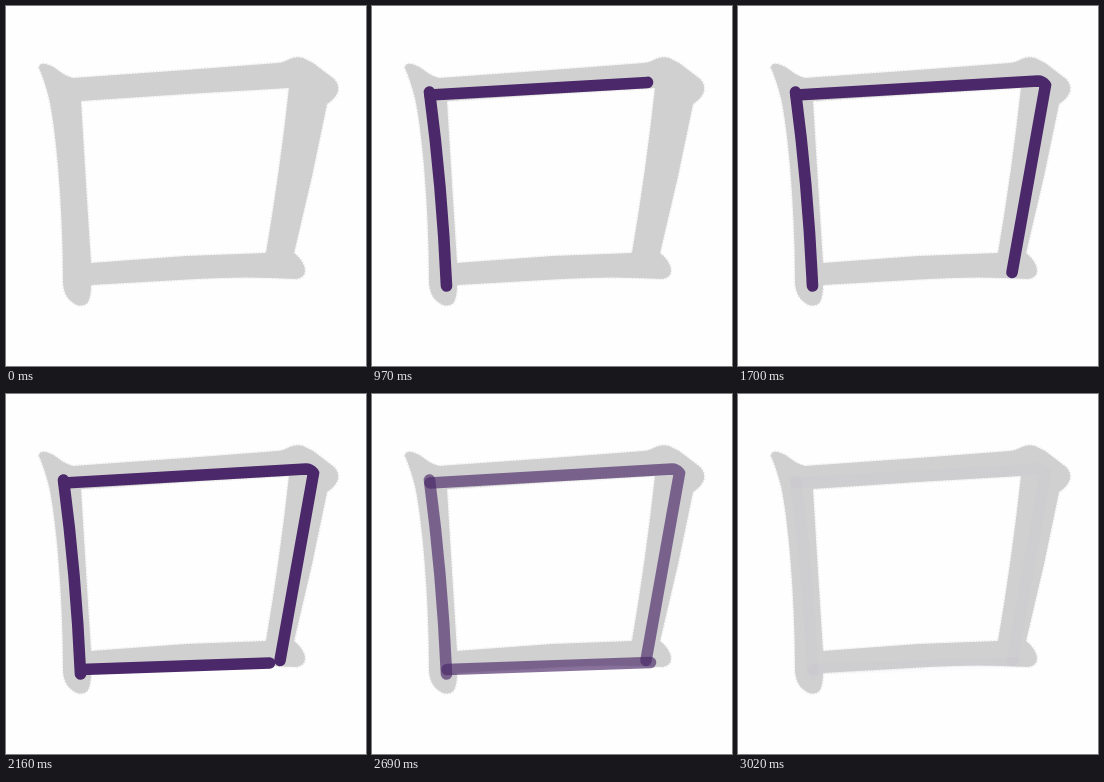
Recreate the animation shown at these times as an HTML page. Size 360 by 360 pixels, loop 3.08 s.

```html
<!DOCTYPE html>
<html lang="en">
<head>
<meta charset="utf-8">
<title>Stroke order</title>
<style>
  html, body { margin: 0; width: 100%; height: 100%; overflow: hidden; background: #fefefe; }
  svg { display: block; width: 100vw; height: 100vh; }
  .shape { fill: #d0d0d0; fill-rule: evenodd; }
  .fringe { fill: none; stroke: #d0d0d0; stroke-width: 2.4; stroke-dasharray: 1.5 1.5; opacity: .45; }
  .pen { fill: none; stroke: #4b2869; stroke-width: 11.6; stroke-linecap: round; stroke-linejoin: round; }
</style>
</head>
<body>
<svg viewBox="0 0 360 360">
  <defs>
    <path id="glyph" d="M33 62 Q33 57 40 58 Q47 60 53 65 Q59 70 67 72 L180 64 L272 57
      Q279 56 284 53 Q290 50 297 52 L307 57 L328 73 Q333 78 332 85 Q330 92 321 98
      L306 170 L288 247 Q298 255 299 264 Q299 272 290 273 Q240 270 190 273 L85 279
      Q85 290 82 296 Q78 301 71 299 Q58 293 57 277 Q57 220 52 160 Q48 115 43 92 Q38 73 33 62 Z
      M75 95 L180 88 L283 82 Q274 165 260 247 L180 250 L85 257 Q80 180 75 95 Z"/>
  </defs>
  <use href="#glyph" class="shape"/>
  <use href="#glyph" class="fringe"/>
  <g id="pens"></g>
</svg>
<script>
const LOOP = 3080;
const FADE = [2510, 3030];
const STROKES = [
  { d: 'M57.5 86 Q70 180 74.5 280', start: 30, end: 545 },
  { d: 'M58 89 L300 75 Q304 75 307.5 79 L274 266.5', start: 600, end: 1700 },
  { d: 'M75 275.5 L278.5 268.5', start: 1755, end: 2275 }
];

const clamp = v => Math.min(1, Math.max(0, v));
const progress = (t, start, end) => clamp((t - start) / (end - start));

// cubic-bezier(0, 0, .58, 1)
function easeOut(x) {
  let low = 0, high = 1;
  for (let i = 0; i < 20; i++) {
    const s = (low + high) / 2;
    if (1.74 * s * s * (1 - s) + s ** 3 < x) low = s; else high = s;
  }
  return low * low * (3 - 2 * low);
}

const group = document.getElementById('pens');
const pens = STROKES.map(stroke => {
  const path = document.createElementNS('http://www.w3.org/2000/svg', 'path');
  path.setAttribute('d', stroke.d);
  path.setAttribute('class', 'pen');
  group.append(path);
  return { ...stroke, path, length: path.getTotalLength() };
});

function render(t) {
  const opacity = 1 - progress(t, ...FADE);
  for (const { path, length, start, end } of pens) {
    const p = progress(t, start, end);
    const drawn = p === 1 ? length + 1 : easeOut(p) * length;
    path.style.strokeDasharray = `${drawn} ${length * 2}`;
    path.style.opacity = opacity;
    path.style.visibility = p > 0 && opacity > 0 ? 'visible' : 'hidden';
  }
}

const origin = performance.now();
function tick() {
  render((performance.now() - origin) % LOOP);
  requestAnimationFrame(tick);
}
tick();
</script>
</body>
</html>
```
